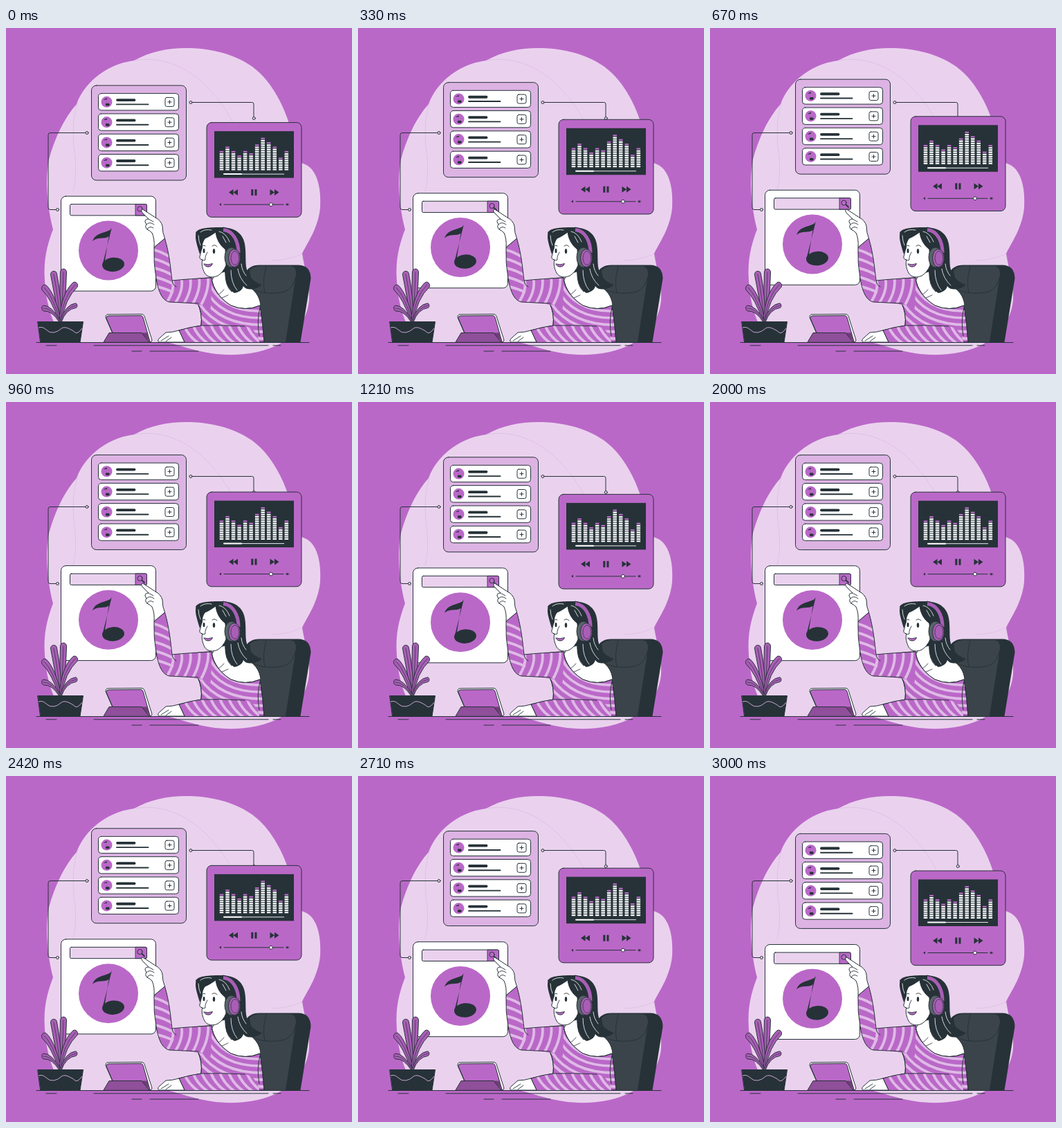
An HTML page for the animation above (3040 ms loop, 500 px wide and 500 px high).

```html
<!DOCTYPE html>
<html lang="en">
<head>
<meta charset="utf-8">
<title>Music search</title>
<style>
  html, body { margin: 0; width: 100%; height: 100%; overflow: hidden; background: #ba68c8 }
  svg { display: block; width: 100vw; height: 100vh }
  .s { stroke: #263238; stroke-linecap: round; stroke-linejoin: round }
  .n { fill: none }
  .d { fill: #263238 }
  .p { fill: #ba68c8 }
  .m { fill: #a85eb5 }
  .l { fill: #ead2ee }
  .w { fill: #fff }
  .stripe { fill: none; stroke: #dfbae6; stroke-width: 3.8 }
  .shine { fill: none; stroke: #fff; stroke-width: .8; stroke-linecap: round }
  .faint { fill: none; stroke: #d3aedb; stroke-width: .7; stroke-dasharray: 2 1 }
</style>
</head>
<body>
<svg viewBox="0 0 500 500">
  <defs>
    <g id="note">
      <path d="M153 288C151 297 130 293 125 308C132 301 143 306 148.500 301L142 342H139.500Z"/>
      <ellipse cx="155" cy="342" rx="16" ry="10.200" transform="rotate(-5 155 342)"/>
    </g>
    <path id="arm" d="M214 317L229.500 304C236 326 238 348 240 365C258 363 278 362 297 361L296 405C276 397 252 397 236 396C224 393 220 378 217 362Q213 340 214 317Z"/>
    <path id="torso" d="M272 363Q284 361 297 361C299 377 309 391 325 401Q346 410 367 401Q371 425 373 454H258L250 437Q266 433 282 430Q284 412 277 398Z"/>
    <path id="sleeve" d="M250 437Q266 432 282 430Q318 429 345 431Q362 434 366 454H258Z"/>
    <clipPath id="armClip"><use href="#arm"/></clipPath>
    <clipPath id="torsoClip"><use href="#torso"/></clipPath>
    <clipPath id="sleeveClip"><use href="#sleeve"/></clipPath>
  </defs>

  <path class="l" d="M185 47C210 33 238 28 267 29C314 31 353 46 376 75C400 104 414 145 417 175C418 188 423 194 432 197C449 204 456 230 454 260C451 290 435 311 428 326C431 345 437 366 438 384C440 410 425 439 398 455C370 472 326 475 296 470C270 466 250 458 236 455H90C68 435 58 400 56 365C54 335 59 315 68 291C60 260 56 220 62 190C70 160 84 130 102 110C111 84 140 53 185 47Z"/>
  <path class="faint" d="M185 47C220 41 255 52 285 80Q312 106 327 135M104 106C96 130 96 155 99 180Q103 210 97 236M428 326Q410 335 384 336"/>

  <g class="s n">
    <path d="M115 151.500H64Q61 151.500 61 154.500V259.500Q61 262.500 64 262.500H73M269 107.500H355.500Q358 107.500 358 110V129"/>
    <g class="l"><circle cx="117" cy="151.500" r="2"/><circle cx="74.500" cy="262.500" r="2"/><circle cx="267" cy="107.500" r="2"/><circle cx="358.300" cy="130.500" r="2"/></g>
  </g>

  <!-- chair -->
  <path class="d" d="M345 356Q350 342.500 366 342.500H423Q440 343 440.500 362L425.500 454H366Z"/>
  <path fill="#3a444a" d="M352 350Q358 344 366 344H411Q420 345 419 357L404 454H370Z"/>
  <path class="s n" stroke-width=".9" d="M352 375Q366 385 392 383Q412 382 417 365Q421 350 430 347M376 345Q370 365 374 383"/>

  <path class="s n" d="M44 454.500H438M58 458.800H73M127 458.800H379M386 458.800H397M182 467H196M208 467H278"/>

  <g id="panels"></g>

  <!-- tablet -->
  <path class="s w" d="M144 418Q144 414 147 414L196 413.500Q199 413.500 200 416.500L211 451Q211 454 207 454H160Z"/>
  <path class="s p" d="M145 419Q145 416 148 416L195 415.500Q197 415.500 198 418L208 453H160Z"/>
  <path fill="#6f3e78" d="M195 440.500H204.500L208 453Z"/>
  <path class="s" fill="#8f4f9a" d="M141 454L149 440.500H196L207 454Z"/>

  <g id="plant"></g>
  <path class="s d" d="M46 424.500H111.500L107 454H50Z"/>
  <path class="n" stroke="#dcb3e3" stroke-width=".9" d="M47 433Q53 431 58 436T69 440T79 435T90 434T100 440T110 434"/>

  <!-- woman -->
  <path class="d" d="M274 296C277 289 292 288 309 288C332 288 345 297 346 320C347 337 345 346 351 356Q356 367 370 371Q362 379 349 377Q345 375 342 371Q340 380 331 383Q321 379 317 362L300 330Z"/>
  <path class="s w" d="M300 357Q299 367 296 362C300 381 311 395 326 402Q347 410 368 402C367 384 354 373 340 369Q334 377 326 381Q316 372 317 352Z"/>
  <path class="d" d="M316 345C316 365 321 378 330 383Q341 381 343 373Q347 379 358 377Q341 365 333 342Z"/>
  <path class="shine" d="M325 350Q325 368 334 379M335 348Q337 362 348 372"/>
  <path class="s n" stroke-width=".8" d="M306 386Q312 382 315 378M310 391L321 386"/>
  <path class="s w" d="M283 306C282 316 283 322 280 330Q279 334 284 335C282 341 284 348 287 354C291 361 300 361 306 358Q314 353 318 343L317 320Q305 311 303 295Q294 302 283 306Z"/>
  <path class="d" d="M304 292C292 296 283 307 284 318L280 327C276 313 272 303 275 295Q287 287 304 292ZM302 292Q305 310 318 320L332 326L338 300Q322 286 302 292Z"/>
  <path class="shine" d="M281 295Q287 290 297 292M278 300Q278 307 281 314M308 294Q318 296 323 309M313 301L318 310M340 341Q341 351 347 358"/>
  <ellipse class="d" cx="286" cy="322" rx="1.500" ry="3.300"/>
  <ellipse class="d" cx="300.500" cy="322.500" rx="1.700" ry="3.500"/>
  <path class="s n" stroke-width=".9" d="M284 315Q286 313 288 315M298 315Q302 312 305 316M291 324Q287 331 288 335Q285 337 283 335"/>
  <path class="s p" stroke-width=".9" d="M286 341Q292 343 298.500 340.500Q296 347 289 344.500Z"/>
  <path class="n" stroke="#263238" stroke-width="7" d="M313 291C328 293 337 308 337 325"/>
  <path class="n" stroke="#a85eb5" stroke-width="5" d="M314 291.500C328 293 336 308 336 325"/>
  <ellipse class="s" fill="#59636a" cx="326" cy="331.500" rx="10" ry="14.500"/>
  <ellipse class="s m" cx="330" cy="332.500" rx="8.500" ry="13"/>
  <ellipse class="s n" stroke-width=".7" cx="331" cy="332.500" rx="6" ry="10"/>

  <use href="#torso" class="s p"/>
  <g clip-path="url(#torsoClip)" id="torsoStripes"></g>
  <use href="#torso" class="s n"/>
  <use href="#sleeve" class="p"/>
  <g clip-path="url(#sleeveClip)" id="sleeveStripes"></g>
  <path class="s n" d="M258 454L250 437Q266 432 282 430Q315 429 345 431M367 404Q362 424 366 445"/>
  <path class="p" d="M272 364H297L296 401L277 397Z"/>
  <use href="#arm" class="p"/>
  <g clip-path="url(#armClip)" id="armStripes"></g>
  <path class="s n" d="M297 361C278 362 258 363 240 365C238 348 236 326 229.500 304L214 317Q213 340 217 362C220 378 224 393 236 396Q257 397 278 398M240 365Q241 372 246 374"/>
  <path class="s w" d="M197 262Q194 264 198 268L206 276Q201 276 201 280L203 284Q200 287 204 291Q208 293 211 296Q215 305 214 317L229.500 304Q226 296 226 286Q224 278 216 274Z"/>
  <path class="s n" stroke-width=".9" d="M206 276L213 280M203 284Q207 279 214 284M204 291Q207 285 213 289"/>
  <path class="s w" d="M250 437L258 454H221Q218 451 222 448L231 440Q240 440 250 437Z"/>
  <path class="s n" stroke-width=".9" d="M224 452L235 445M231 453L239 447"/>
</svg>
<script>
const $ = id => document.getElementById(id);
const each = (list, draw) => list.map(draw).join('');
const box = (cls, x, y, w, h, r) =>
  `<rect class="${cls}" x="${x}" y="${y}" width="${w}" height="${h}" rx="${r}"/>`;
const path = (cls, d, more = '') => `<path class="${cls}" d="${d}" ${more}/>`;

// song list
const row = (_, i) => `<g transform="translate(0 ${i * 29.3})">
  ${box('s w', 133.5, 95, 116, 24.3, 4)}
  <circle class="p" cx="145.500" cy="107.200" r="8"/>
  <use href="#note" class="d" transform="translate(145.500 107.200) scale(.187) translate(-148 -321.500)"/>
  ${path('s', 'M161 104.500H185.500', 'stroke-width="3.800"')}
  ${path('s', 'M160 110.800H205.500', 'stroke-width="1.900"')}
  ${box('s n', 230, 100.8, 13, 13, 2.5)}
  ${path('s', 'M234 107.300H239M236.500 104.800V109.800')}</g>`;
const list = `<rect class="s" fill="#dcb3e3" x="123.500" y="83.400" width="137" height="137" rx="7"/>` +
  each([0, 1, 2, 3], row);

// player
const PITCH = 3.2, CELL = 2.2;
const bar = (n, i) => {
  const x = 311.5 + i * 8.53, top = 206 - (n - 1) * PITCH;
  return path('', `M${x} 206V${top}`, `stroke="#fff" stroke-width="5.500" stroke-dasharray="${CELL} ${PITCH - CELL}"`) +
    path('', `M${x} ${top}v${-CELL}`, 'stroke="#ba68c8" stroke-width="5.500"');
};
const arrows = 'M322 238L328.500 233.500V242.500ZM328.500 238L335 233.500V242.500Z';
const player = box('s p', 290, 137, 137, 136.7, 7) + box('d', 301, 149.5, 115, 67.5, 0) +
  each([9, 11, 9, 7, 9, 8, 12, 15, 13, 11, 6, 9], bar) +
  path('', 'M315 211.500H402', 'stroke="#fff" stroke-width=".9"') +
  path('', 'M315 211.500H340', 'stroke="#fff" stroke-width="2" stroke-linecap="round"') +
  path('d', arrows) + path('d', arrows, 'transform="translate(716.500 0) scale(-1 1)"') +
  box('d', 354.3, 233.5, 3, 9, 0) + box('d', 359.5, 233.5, 3, 9, 0) +
  path('s', 'M315 255.500H401') + path('d', 'M308 255.500L311 253.500V257.500ZM404 255.500L407 253.500V257.500ZM407.500 254h1v3h-1Z') +
  '<circle class="s w" cx="383" cy="255.500" r="2.500"/>';

// search card
const search = box('s w', 79.5, 243.5, 137, 137, 7) + box('s l', 92.5, 255, 111, 16.3, 2) +
  path('s p', 'M187.500 255H201.500Q203.500 255 203.500 257V269.300Q203.500 271.300 201.500 271.300H187.500Z') +
  '<circle class="s n" cx="193.500" cy="261.800" r="3.600"/>' +
  path('s', 'M196.500 264.500L200 268', 'stroke-width="1.800"') +
  '<circle class="p" cx="148" cy="321.800" r="43"/><use href="#note" class="d" y=".3"/>';

const panels = $('panels');
panels.innerHTML = list + player + search;

// plant: each leaf bends from the pot through (cx, cy) to a round tip
const leaf = ([tx, ty, cx, cy, w]) => {
  const len = Math.hypot(tx - cx, ty - cy), nx = (cy - ty) / len * w, ny = (tx - cx) / len * w;
  return path('s m', `M77 425Q${cx - nx} ${cy - ny} ${tx - nx} ${ty - ny}A${w} ${w * 1.1} 0 0 1 ${tx + nx} ${ty + ny}Q${cx + nx} ${cy + ny} 80 425Z`) +
    path('s n', `M78.500 425Q${cx} ${cy} ${tx} ${ty}`, 'stroke-width=".7"');
};
$('plant').innerHTML = each([
  [83, 353, 82, 395, 4.5], [69, 356, 76, 392, 4.5], [55, 375, 68, 387, 4.5],
  [100, 371, 82, 388, 4.5], [54, 405, 66, 404, 4], [101, 401, 86, 403, 3.3]
], leaf);

// sweater stripes
const stripes = (n, curve) => each([...Array(n).keys()], i => path('stripe', curve(i)));
$('armStripes').innerHTML =
  stripes(5, i => `M210 ${320 + i * 13}Q224 ${322 + i * 13} 242 ${334 + i * 12}`) +
  stripes(5, i => `M${240 + i * 13} 360Q${246 + i * 12} 378 ${230 + i * 13} 400`);
$('torsoStripes').innerHTML =
  stripes(6, i => `M${292 - i * 4} ${366 + i * 11}Q${312 - i * 2} ${412 + i * 9} 374 ${409 + i * 10}`);
$('sleeveStripes').innerHTML =
  stripes(9, i => `M${257 + i * 13} 429Q${263 + i * 13} 445 ${279 + i * 13} 456`);

const LOOP = 3040, FLOAT = 1514, LEAD = 28, RISE = 10;
const start = performance.now();
function frame() {
  const t = (performance.now() - start) % LOOP + LEAD;
  const rise = RISE * (1 - Math.abs(1 - t % FLOAT / (FLOAT / 2)));
  panels.setAttribute('transform', `translate(0 ${-rise})`);
  requestAnimationFrame(frame);
}
frame();
</script>
</body>
</html>
```
